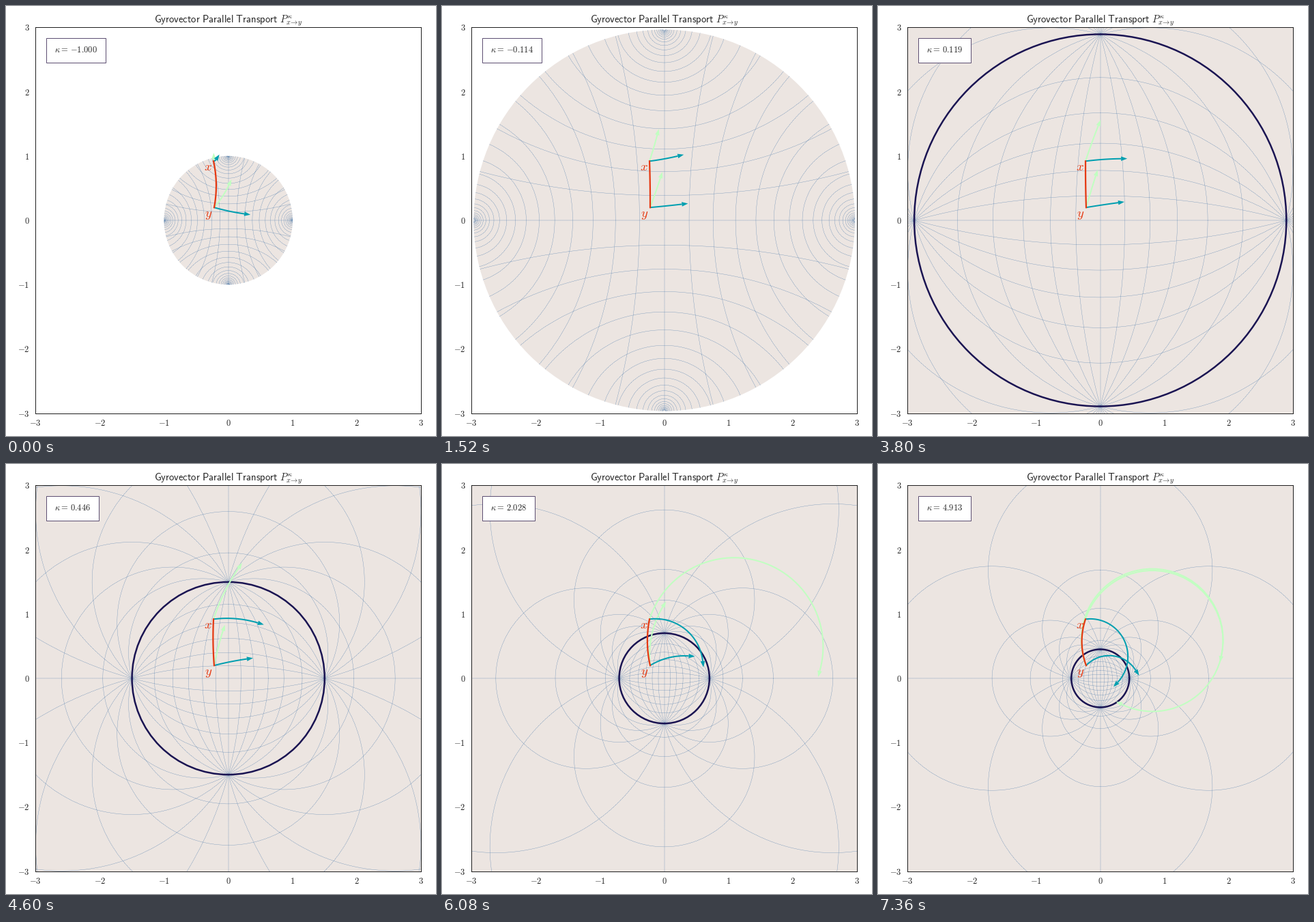
Animation, 630 px wide and 630 px high, one loop 7400 ms. Source, as a matplotlib script:

```python
import numpy as np
import matplotlib.pyplot as plt
from matplotlib.animation import FuncAnimation
from matplotlib.collections import LineCollection
from matplotlib.patches import Circle, Polygon, Rectangle
from matplotlib.transforms import IdentityTransform

plt.rcParams.update({"mathtext.fontset": "cm", "text.color": "0.15",
                     "axes.edgecolor": "0.12", "axes.linewidth": 0.8})

SIZE, DPI = 630, 90
PAPER, GRID, RING = "#ece5e1", "#3a6ea5", "#1a1452"
RED, TEAL, GREEN = "#e53912", "#009fb0", "#c1ffc1"

# curvature runs along a cubic; nearly flat steps are dropped
kappas = np.linspace(-1, 1.7, 200) ** 3
kappas = kappas[np.abs(kappas) > 1e-3]

X, Y = -0.23 + 0.92j, -0.22 + 0.20j
VECTORS = [(np.exp(1j * np.radians(72)), GREEN),
           (np.exp(1j * np.radians(7.2)), TEAL)]
STEP = np.pi / 24
T = np.linspace(0, 1, 90)


def xy(z):
    return np.column_stack([z.real, z.imag])


def add(a, b, k):
    """Moebius addition in the plane of curvature k."""
    return (a + b) / (1 - k * np.conj(a) * b)


def tan_k(t, k):
    r = abs(k) ** -0.5
    return r * (np.tan(t / r) if k > 0 else np.tanh(t / r))


def atan_k(t, k):
    r = abs(k) ** -0.5
    return r * (np.arctan(t / r) if k > 0 else np.arctanh(t / r))


def shoot(p, u, k):
    """Unit length geodesic from p in direction u."""
    return add(p, tan_k(T / 2, k) * u, k)


def connect(p, q, k):
    d = add(-p, q, k)
    return add(p, tan_k(T * atan_k(abs(d), k), k) * d / abs(d), k)


def transport(u, k):
    turn = 1 + k * Y * np.conj(X)
    return u * turn / np.conj(turn)


def grid(k):
    r = abs(k) ** -0.5
    reach = r if k < 0 else 4
    lines = [np.array([-reach, reach]) * d for d in (1, 1j)]
    if k > 0:
        circle = np.exp(1j * np.linspace(0, 2 * np.pi, 541))
        for i in range(1, 12):
            a = r * np.tan(i * STEP)
            arc = (a - r * r / a) / 2 + (a + r * r / a) / 2 * circle
            lines += [arc, 1j * arc]
    else:
        for i in range(1, 23):
            a = r * np.tanh(i * STEP)
            rad = (r * r - a * a) / (2 * a)
            phi = np.arctan2(r, rad) * np.linspace(-1, 1, 81)
            arc = a + rad - rad * np.exp(1j * phi)
            lines += [arc * 1j ** n for n in range(4)]
    return [xy(z) for z in lines]


fig = plt.figure(figsize=(SIZE / DPI, SIZE / DPI), dpi=DPI, facecolor="white")
ax = fig.add_axes([43.1 / SIZE, 33.4 / SIZE, 565.2 / SIZE, 565.2 / SIZE])
ax.set(xlim=(-3, 3), ylim=(-3, 3))
ticks = range(-3, 4)
labels = [f"${n}$" for n in ticks]
ax.set_xticks(ticks, labels)
ax.set_yticks(ticks, labels)
ax.tick_params(bottom=False, left=False, labelsize=10, labelcolor="0.15")
ax.set_title(r"$\mathsf{Gyrovector\ Parallel\ Transport}\ "
             r"P^{\kappa}_{x\!\rightarrow\!y}$", fontsize=11.7, pad=6)

disc = ax.add_patch(Circle((0, 0), 1, fc=PAPER, lw=0, zorder=0))
mesh = ax.add_collection(LineCollection([], colors=GRID, linewidths=0.3,
                                        linestyles="--", zorder=1),
                         autolim=False)
ring = ax.add_patch(Circle((0, 0), 1, fill=False, ec=RING, lw=2, zorder=1.5))


class Arrow:
    def __init__(self, color):
        self.line, = ax.plot([], [], color=color, lw=1.6, zorder=2,
                             solid_capstyle="butt")
        self.head = ax.add_patch(Polygon(np.zeros((3, 2)), fc=color, lw=0,
                                         zorder=2))

    def set(self, z):
        self.line.set_data(z.real, z.imag)
        d = z[-1] - z[-2]
        d /= abs(d)
        self.head.set_xy(xy(z[-1] + d * np.array([0.096, 0.035j, -0.035j])))


arrows = [(Arrow(c), Arrow(c), u) for u, c in VECTORS]
path, = ax.plot([], [], color=RED, lw=1.8, zorder=2.2)
for p, name in ((X, "$x$"), (Y, "$y$")):
    ax.text(p.real - 0.15, p.imag - 0.15, name, color=RED, fontsize=15,
            zorder=2.1)

pixels = IdentityTransform()
box = ax.add_patch(Rectangle((59, SIZE - 83), 87, 36, fc="white",
                             ec="#5d4f72", lw=0.8, zorder=3,
                             transform=pixels))
readout = ax.text(71, SIZE - 68.5, "", fontsize=10, zorder=4,
                  transform=pixels)


def update(i):
    k = kappas[i]
    r = abs(k) ** -0.5
    disc.set_radius(r if k < 0 else 9)
    ring.set_radius(r)
    ring.set_visible(k > 0)
    mesh.set_segments(grid(k))
    for at_x, at_y, u in arrows:
        at_x.set(shoot(X, u, k))
        at_y.set(shoot(Y, transport(u, k), k))
    z = connect(X, Y, k)
    path.set_data(z.real, z.imag)
    box.set_width(87 if k < 0 else 77)
    sign = "{-}" if k < 0 else ""
    readout.set_text(rf"$\kappa =\,{sign}{abs(k):.3f}$")


anim = FuncAnimation(fig, update, frames=len(kappas), interval=40,
                     init_func=lambda: update(0), repeat=True, repeat_delay=0)
plt.show()
```
